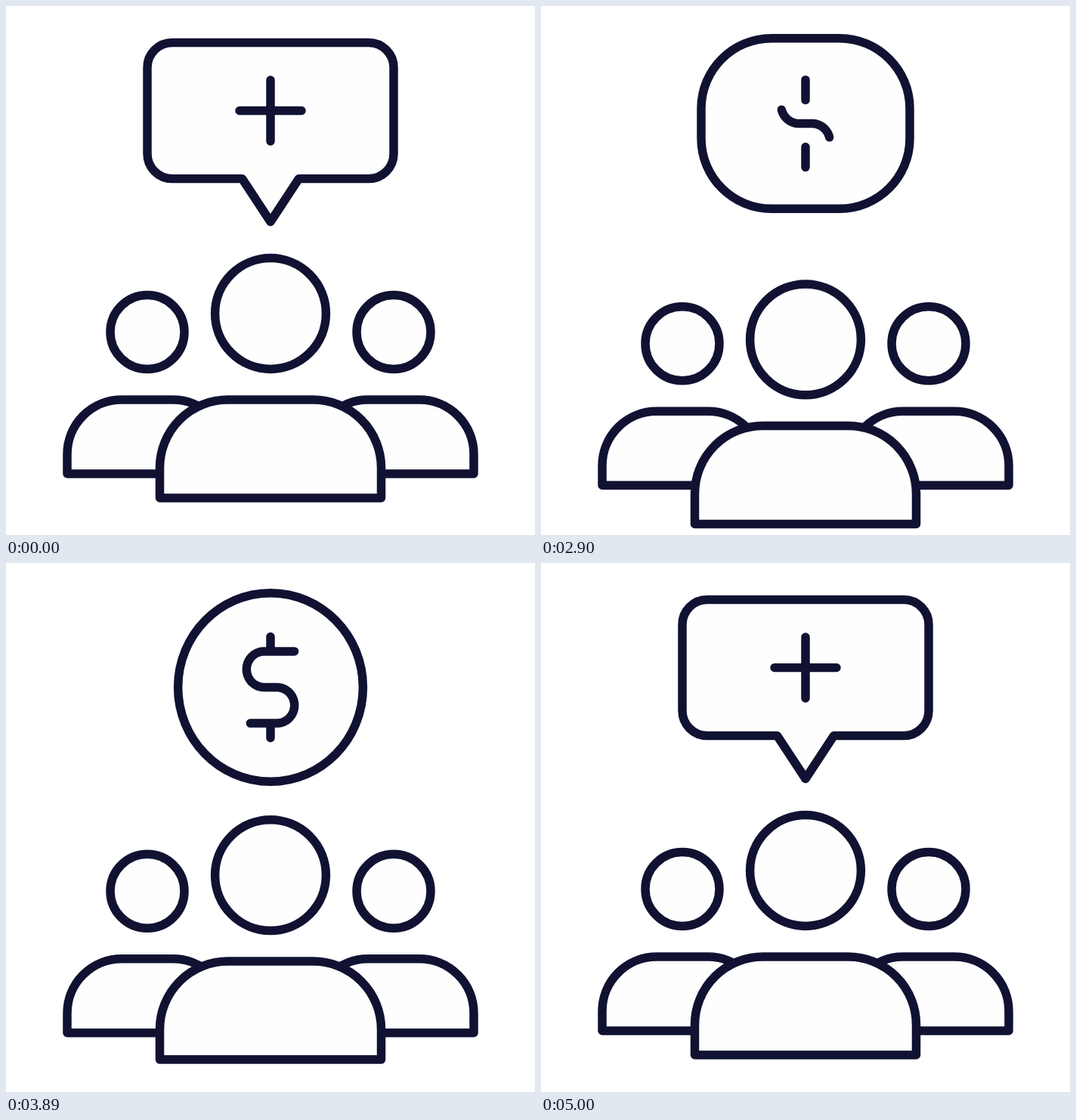
These frames come from a looping animation (700 px wide and 700 px high, 5030 ms). An HTML page with a canvas:

```html
<!DOCTYPE html>
<html lang="en">
<head>
<meta charset="utf-8">
<title>Group funding</title>
<style>
html, body { margin: 0; width: 100%; height: 100%; overflow: hidden; background: #fff; }
canvas { display: block; width: 700px; height: 700px; }
</style>
</head>
<body>
<canvas id="stage" width="700" height="700"></canvas>
<script>
const ctx = document.getElementById('stage').getContext('2d');
const LOOP = 5030, HOLD = 2030, STEP = 30;
const INK = '#111232', FILL = '#fefefe', LINE = 11.5, MID = 350;

const clamp = u => Math.max(0, Math.min(1, u));
const mix = (a, b, u) => a + (b - a) * u;
const span = (t, a, b) => clamp((t - a) / (b - a));
const sine = u => (1 - Math.cos(Math.PI * u)) / 2;

// cubic-bezier(.4, 0, .2, 1)
function glide(x) {
  let lo = 0, hi = 1;
  for (let i = 0; i < 24; i++) {
    const p = (lo + hi) / 2, q = 1 - p;
    if (1.2 * q * q * p + 0.6 * q * p * p + p * p * p < x) lo = p; else hi = p;
  }
  return lo * lo * (3 - 2 * lo);
}

// Smooth curve through [time, value] keys, flat at turning points
function curve(keys, t) {
  const n = keys.length - 1;
  if (t <= keys[0][0]) return keys[0][1];
  if (t >= keys[n][0]) return keys[n][1];
  let i = 0;
  while (t >= keys[i + 1][0]) i++;
  const rate = j => (keys[j + 1][1] - keys[j][1]) / (keys[j + 1][0] - keys[j][0]);
  const slope = j => {
    if (j === 0 || j === n) return 0;
    const a = rate(j - 1), b = rate(j);
    return a * b <= 0 ? 0 : 2 * a * b / (a + b);
  };
  const [t0, a] = keys[i], [t1, b] = keys[i + 1];
  const d = t1 - t0, u = (t - t0) / d, v = 1 - u;
  return a * v * v * (1 + 2 * u) + b * u * u * (1 + 2 * v)
    + d * u * v * (slope(i) * v - slope(i + 1) * u);
}

const COIN_SCALE = [
  [2000, 1], [2030, 0.982], [2240, 0.86], [2540, 1.07], [2900, 1],
  [3220, 0.82], [3620, 1.03], [3890, 1], [4310, 0.975]
];

function paint(filled) {
  if (filled) { ctx.fillStyle = FILL; ctx.fill(); }
  ctx.stroke();
}

function head(x, y, r) {
  ctx.beginPath();
  ctx.arc(x, y, r, 0, 2 * Math.PI);
  paint(true);
}

function torso(x, half, top, bottom, r) {
  ctx.beginPath();
  ctx.moveTo(x - half, bottom);
  ctx.lineTo(x - half, top + r);
  ctx.arc(x - half + r, top + r, r, Math.PI, 1.5 * Math.PI);
  ctx.arc(x + half - r, top + r, r, 1.5 * Math.PI, 2 * Math.PI);
  ctx.lineTo(x + half, bottom);
  ctx.closePath();
  paint(true);
}

function people(t) {
  const dip = t < 2600 ? glide(span(t, 2030, 2600)) : 1 - glide(span(t, 2600, 4950));
  const near = 36 * dip, far = 16 * dip;
  ctx.lineWidth = LINE;
  for (const side of [-1, 1]) {
    head(MID + side * 163, 431.5 + far, 49);
    torso(MID + side * 163, 106, 521 + far, 619 + far, 72);
  }
  head(MID, 407 + near, 73.4);
  torso(MID, 146.5, 521 + near, 651 + near, 90);
}

// Point on the S, s = signed length from its centre
function sPoint(s) {
  const d = Math.abs(s), r = 23.8, flat = 8.5, arc = Math.PI * r;
  let x = d, y = 0;
  if (d > flat + arc) {
    x = flat - (d - flat - arc);
    y = 2 * r;
  } else if (d > flat) {
    const a = (d - flat) / r;
    x = flat + r * Math.sin(a);
    y = r * (1 - Math.cos(a));
  }
  return s < 0 ? [-x, -y] : [x, y];
}

function sign(t) {
  const turned = t >= 3690;
  const turn = Math.PI * sine(span(t, 3690, 4930));
  const back = turn > Math.PI / 2;
  const squeeze = turned ? Math.abs(Math.cos(turn)) : 1;
  const m = back ? 0 : sine(span(t, 2540, 3140));
  const scale = back ? 1 + 0.04 * (1 - turn / Math.PI) : curve(COIN_SCALE, t);
  const pivot = mix(286, 164.5, m);
  const cy = mix(138.5, 164.5, m);
  const at = (x, y) => [MID + x * scale * squeeze, pivot + (cy + y - pivot) * scale];
  const move = (x, y) => ctx.moveTo(...at(x, y));
  const line = (x, y) => ctx.lineTo(...at(x, y));
  ctx.lineWidth = LINE * scale;

  // Outline
  const w = mix(163, 124.8, m), h = mix(90, 124.8, m);
  const fx = 130 * (1 - m), fy = 57 * (1 - m), k = 0.5523;
  const bx = fx + (w - fx) * k, by = fy + (h - fy) * k;
  const bend = (...p) => ctx.bezierCurveTo(...at(p[0], p[1]), ...at(p[2], p[3]), ...at(p[4], p[5]));
  const tail = clamp(1 - m / 0.5);
  ctx.beginPath();
  move(-fx, -h);
  line(fx, -h);
  bend(bx, -h, w, -by, w, -fy);
  line(w, fy);
  bend(w, by, bx, h, fx, h);
  if (tail > 0) {
    const base = 37.5 * (1 - m);
    line(base, h);
    line(0, h + 57 * tail);
    line(-base, h);
  }
  line(-fx, h);
  bend(-bx, h, -w, by, -w, fy);
  line(-w, -fy);
  bend(-w, -by, -bx, -h, -fx, -h);
  ctx.closePath();
  paint(true);

  // Plus that becomes a dollar sign
  const angle = back ? 0 : Math.PI * sine(span(t, 1995, 2560));
  const c = Math.cos(angle), s = Math.sin(angle);
  const spin = (x, y) => [x * c - y * s, x * s + y * c];
  const inner = mix(0, 47.5, m), outer = mix(40.5, 67, m);
  const curl = back ? 0 : sine(span(t, 2560, 2860));
  const grow = back ? 0 : sine(span(t, 2870, 3240));
  const start = -mix(41 - 2 * curl, 119, grow), end = mix(41 - 2 * curl, 124, grow);
  ctx.beginPath();
  for (const dir of [-1, 1]) {
    move(...spin(0, dir * inner));
    line(...spin(0, dir * outer));
  }
  const n = 80;
  for (let i = 0; i <= n; i++) {
    const d = mix(start, end, i / n), [x, y] = sPoint(d);
    const p = spin(mix(d, x, curl), y * curl);
    if (i) line(...p); else move(...p);
  }
  paint(false);
}

function draw(time) {
  const t = time < HOLD ? 0 : HOLD + Math.floor((time - HOLD) / STEP) * STEP;
  ctx.fillStyle = '#fff';
  ctx.fillRect(0, 0, 700, 700);
  ctx.strokeStyle = INK;
  ctx.lineCap = ctx.lineJoin = 'round';
  people(t);
  sign(t);
}

const began = performance.now();
function tick() {
  draw((performance.now() - began) % LOOP);
  requestAnimationFrame(tick);
}
tick();
</script>
</body>
</html>
```
